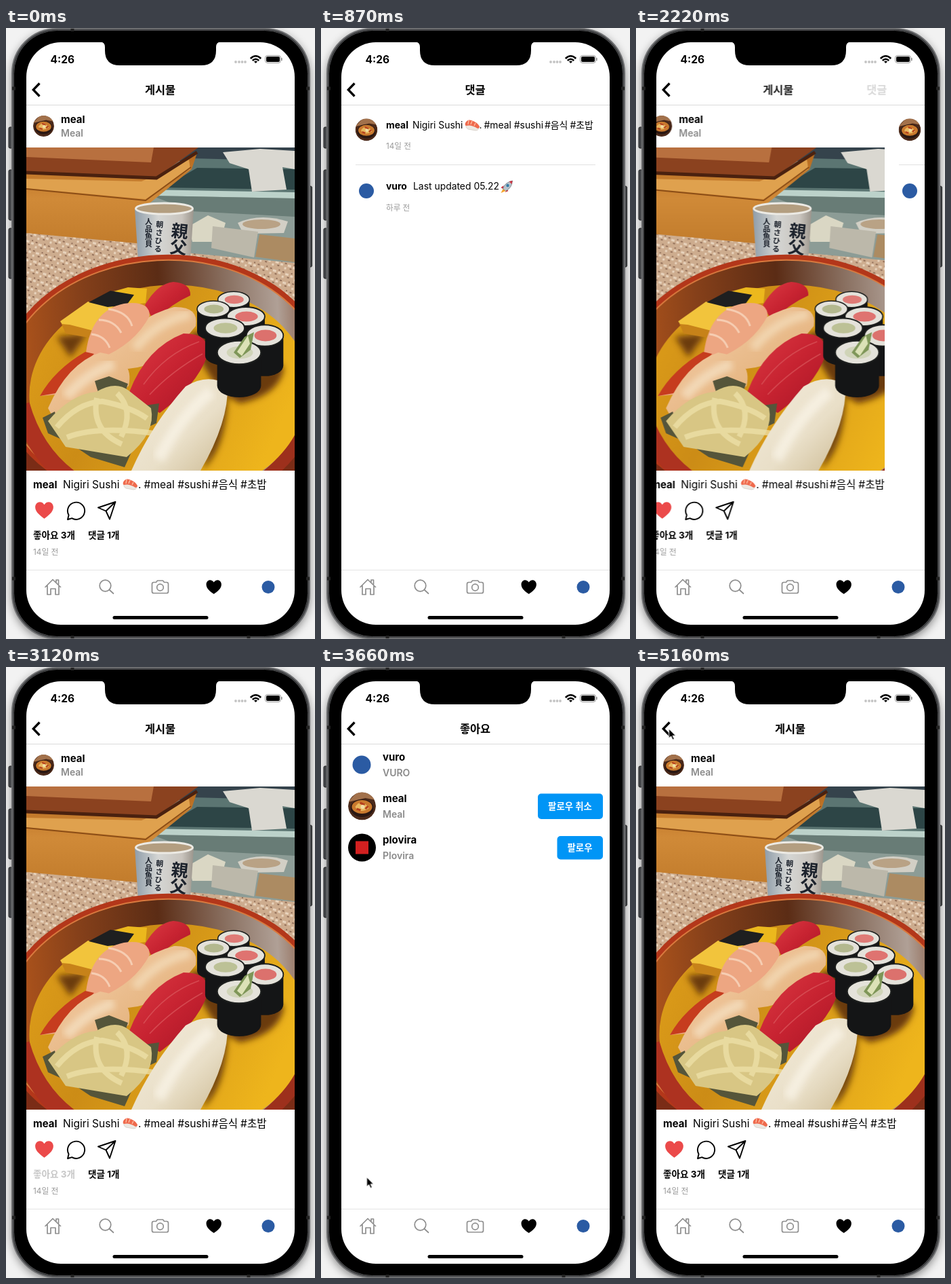
These frames come from a looping animation (456 by 900 pixels, 5.4 s). An HTML page:

```html
<!DOCTYPE html>
<html lang="ko">
<head>
<meta charset="utf-8">
<title>게시물</title>
<style>
  html, body { margin: 0; width: 100%; height: 100%; overflow: hidden; background: #eee; }
  svg { display: block; }
  #stage { width: 456px; height: 900px; }
  text { font: 15px Inter, "Noto Sans CJK KR", "Noto Sans CJK", sans-serif; white-space: pre; }
  .b { font-weight: 700; }
  .title { font-size: 16.4px; font-weight: 600; text-anchor: middle; }
  .sub { font-size: 14px; font-weight: 600; fill: #8a8a8a; }
  .date { font-size: 11.8px; fill: #999; }
  .count { font-size: 13.6px; font-weight: 700; }
  .caption text { font-size: 15.6px; }
  .small text { font-size: 13.9px; }
  .small .date { font-size: 11.6px; }
  .btn { font-size: 13.4px; font-weight: 700; fill: #fff; text-anchor: middle; }
  .ink text { font-weight: 700; font-size: 11px; }
  .ink .big { font-size: 25px; }

  .under, .comments, .likes { animation: under 5.4s cubic-bezier(.2, .7, .3, 1) infinite; --from: 396px; }
  .comments { animation-name: comments; }
  .likes { animation-name: likes; }
  .title { --gone: 0; --from: 150px; }
  @keyframes under {
    0%, 10.185%, 43.333%, 64.074%, 95.556%, 100% { transform: none; opacity: 1; }
    16.111%, 39.63%, 67.778%, 92.407% { transform: translateX(-119px); opacity: var(--gone, 1); }
  }
  @keyframes comments {
    0%, 10.185%, 43.333%, 100% { transform: translateX(var(--from)); opacity: var(--gone, 1); }
    16.111%, 39.63% { transform: none; opacity: 1; }
  }
  @keyframes likes {
    0%, 64.074%, 95.556%, 100% { transform: translateX(var(--from)); opacity: var(--gone, 1); }
    67.778%, 92.407% { transform: none; opacity: 1; }
  }

  .press-comments { animation: press-comments 5.4s step-end infinite; }
  .press-likes { animation: press-likes 5.4s step-end infinite; }
  .press-back { animation: press-back 5.4s step-end infinite; }
  @keyframes press-comments { 0%, 10.185% { opacity: 1; } 6.111% { opacity: .22; } }
  @keyframes press-likes { 0%, 64.444% { opacity: 1; } 57.778% { opacity: .22; } }
  @keyframes press-back { 0%, 40%, 92.778% { opacity: 1; } 36.111%, 88.333% { opacity: .33; } }

  .cursor { animation: move 5.4s infinite, appear 5.4s step-end infinite; }
  @keyframes appear { 0% { opacity: 0; } 65.556%, 100% { opacity: 1; } }
  @keyframes move {
    0%, 69.6% { transform: translate(67.5px, 751.5px); animation-timing-function: cubic-bezier(.4, .1, .6, .9); }
    74.444% { transform: translate(64px, 156px); animation-timing-function: cubic-bezier(.1, .6, .4, 1); }
    82.778%, 100% { transform: translate(48.5px, 91px); }
  }
</style>
</head>
<body>
<svg id="stage" viewBox="0 0 456 900">
  <defs>
    <filter id="shade" x="-10%" y="-10%" width="120%" height="120%"><feGaussianBlur stdDeviation="7"/></filter>
    <filter id="soft"><feGaussianBlur stdDeviation="5"/></filter>
    <linearGradient id="wood" x2="0" y2="1">
      <stop stop-color="#b5691f"/><stop offset=".5" stop-color="#d08a38"/><stop offset="1" stop-color="#c27c2c"/>
    </linearGradient>
    <linearGradient id="bowl">
      <stop stop-color="#b8591c"/><stop offset=".25" stop-color="#85401a"/><stop offset=".5" stop-color="#5b2c15"/>
      <stop offset=".72" stop-color="#8b7263"/><stop offset=".87" stop-color="#b0a096"/><stop offset="1" stop-color="#7d4a30"/>
    </linearGradient>
    <linearGradient id="floor" x2="1" y2=".4">
      <stop stop-color="#e0a01a"/><stop offset=".4" stop-color="#cc8c16"/><stop offset="1" stop-color="#eeb51c"/>
    </linearGradient>
    <linearGradient id="cup">
      <stop stop-color="#8f9da9"/><stop offset=".4" stop-color="#d5d6d4"/><stop offset=".8" stop-color="#c9c4bd"/><stop offset="1" stop-color="#9b958c"/>
    </linearGradient>
    <linearGradient id="tuna" x2="1" y2="1">
      <stop stop-color="#dc3a44"/><stop offset=".5" stop-color="#c72331"/><stop offset="1" stop-color="#a91526"/>
    </linearGradient>
    <linearGradient id="pale" x2="1" y2="1">
      <stop stop-color="#f4ecdc"/><stop offset=".6" stop-color="#e9dfc8"/><stop offset="1" stop-color="#cdbb94"/>
    </linearGradient>
    <linearGradient id="pink" x2="1" y2="1">
      <stop stop-color="#f2c9a2"/><stop offset="1" stop-color="#e2b078"/>
    </linearGradient>
    <pattern id="granite" width="19" height="13" patternUnits="userSpaceOnUse" patternTransform="rotate(17)">
      <rect width="19" height="13" fill="#cdac8e"/>
      <path d="M1 3h3M10 9h3M14 2h2" stroke="#93705a" stroke-width="2"/>
      <path d="M6 5h5M2 10h3M14 6h4" stroke="#ead6c0" stroke-width="3"/>
    </pattern>
    <clipPath id="content"><rect x="30" y="114" width="396" height="684"/></clipPath>
    <clipPath id="photo"><rect x="30" y="176" width="396" height="476"/></clipPath>
    <clipPath id="round"><circle r="20.5"/></clipPath>

    <g id="roll">
      <path d="M-30 0V42A30 15 0 0 0 30 42V0Z" fill="#141516"/>
      <ellipse rx="30" ry="15" fill="#e4e2da" stroke="#1d1f1e" stroke-width="2"/>
      <ellipse cx="1" rx="18" ry="8" fill="currentColor"/>
    </g>
    <g id="dish" clip-path="url(#round)">
      <circle r="20.5" fill="#4b2a1b"/>
      <path d="M-21-6L-7-21H12L21-9L5-12Z" fill="#a2714b"/>
      <ellipse cy="3" rx="17" ry="13" fill="#2a1712"/>
      <ellipse cy="1" rx="15" ry="10" fill="#c9792d"/>
      <path d="M-10 1Q-4-8 3-4T10 3Q2 9-7 6Z" fill="#e8b85f"/>
      <path d="M-3-5L4-2M-8 4L-2 6M5 4L9 0" stroke="#b63f1d" stroke-width="3"/>
      <circle cx="1" cy="1" r="3" fill="#f2dda5"/>
    </g>
    <g id="sushi">
      <path d="M2 9Q11 7 21 13Q21 18 16 18L5 16Q1 14 2 9Z" fill="#ece8e2" stroke="#cfc8bf" stroke-width=".7"/>
      <path d="M1 7Q4 1 10 3Q19 6 22 12Q22 15 19 15Q10 9 2 11Q0 10 1 7Z" fill="#ef6a4d"/>
      <path d="M6 3L5 9M11 4L9 9M16 7L14 11" stroke="#ffc2a6" stroke-width="1.3"/>
    </g>
    <g id="rocket">
      <path d="M5 8L1 11L4 13ZM10 14L7 18L12 16Z" fill="#c92c38"/>
      <path d="M4 13Q6 4 18 1Q17 12 8 16Z" fill="#b9c3cc" stroke="#68747d" stroke-width=".8"/>
      <path d="M13 2L18 1L17 6Z" fill="#ce3341"/>
      <circle cx="11" cy="8" r="2.2" fill="#347ca6"/>
      <path d="M4 13L1 19L8 16Z" fill="#f5a52d"/>
    </g>
    <path id="heart" d="M0 12C-5 8-13 3-13-4.500C-13-9-9.800-12-6.500-12C-3.500-12-1.300-10.500 0-8C1.300-10.500 3.500-12 6.500-12C9.800-12 13-9 13-4.500C13 3 5 8 0 12Z"/>
  </defs>

  <!-- Device -->
  <rect width="456" height="900" fill="#f2f2f2"/>
  <rect x="9" y="4" width="439" height="900" rx="68" opacity=".5" filter="url(#shade)"/>
  <g fill="#45474a" stroke="#242526">
    <rect x="4" y="146" width="8" height="31" rx="2"/>
    <rect x="4" y="209" width="8" height="74" rx="2"/>
    <rect x="4" y="295" width="8" height="74" rx="2"/>
    <rect x="445" y="233" width="6.500" height="119" rx="2"/>
  </g>
  <rect x="9" y="1" width="439" height="898" rx="66" fill="#3a3b3d" stroke="#6d6e70" stroke-width="2"/>
  <rect x="11.500" y="3.500" width="434" height="893" rx="64" fill="#000" stroke="#4d4e50"/>
  <path d="M9 89h5M443 89h5M9 811h5M443 811h5M98 1v4M358 895v4M98 895v4" stroke="#222" stroke-width="5"/>
  <rect x="30" y="21" width="396" height="858" rx="51" fill="#fff"/>
  <path d="M139 20Q146 21 146 28V33Q146 55 168 55H288Q310 55 310 33V28Q310 21 317 20Z"/>

  <!-- Status bar -->
  <text class="b" x="65.500" y="52" style="font-size:15.500px">4:26</text>
  <path d="M339 50h.01M344 50h.01M348.500 50h.01M353 50h.01" stroke="#c4c4c4" stroke-width="3.800" stroke-linecap="round"/>
  <g fill="none" stroke="#000" stroke-width="2.600">
    <path d="M360.800 45Q368.500 37.500 376.200 45M363.800 48Q368.500 43.500 373.200 48"/>
    <path d="M366 49.500Q368.500 47.500 371 49.500L368.500 52Z" fill="#000" stroke="none"/>
  </g>
  <rect x="382.500" y="40.500" width="23" height="11" rx="3.500" fill="none" stroke="#999"/>
  <rect x="384" y="42" width="20" height="8" rx="2"/>
  <path d="M407 44V48" stroke="#999" stroke-width="1.500"/>

  <!-- Header -->
  <text class="title under" x="227.500" y="96.500">게시물</text>
  <text class="title comments" x="227.500" y="96.500">댓글</text>
  <text class="title likes" x="227.500" y="96.500">좋아요</text>
  <path class="press-back" d="M49.500 81.500L40.300 91L49.500 100.500" fill="none" stroke="#000" stroke-width="3.300"/>
  <path d="M30 113.500H426" stroke="#dadada"/>

  <g clip-path="url(#content)">
    <g class="under">
      <use href="#dish" transform="translate(55.500 144.500) scale(.756)"/>
      <text class="b" x="81" y="140">meal</text>
      <text class="sub" x="81" y="159.500">Meal</text>

      <g clip-path="url(#photo)">
        <rect x="30" y="176" width="396" height="476" fill="#7a2c16"/>

        <!-- Glass case -->
        <path d="M200 176H426V350H200Z" fill="#8c9c96"/>
        <path d="M262 176H426V196H240Z" fill="#35434c"/>
        <path d="M275 192L426 196V246L206 242Z" fill="#5b7572"/>
        <path d="M282 206L426 208V238L232 235Z" fill="#2d4546"/>
        <path d="M206 238L426 242V251L215 247Z" fill="#bcd2ca"/>
        <path d="M215 247L426 251V278L275 270Z" fill="#687c76"/>
        <path d="M320 183L375 178L426 181V208L408 205L414 238L363 241L358 208L330 199Z" fill="#dad8d1"/>
        <path d="M270 292L298 276L324 287L316 315H275Z" fill="#dad7c4"/>
        <path d="M342 287Q375 272 416 285L410 302L350 303Z" fill="#d2cfc5"/>
        <ellipse cx="377" cy="289" rx="28" ry="7" fill="#b9a285"/>
        <path d="M305 292L372 300L366 338L303 324Z" fill="#bcb8aa"/>
        <path d="M374 304L426 310V345L368 337Z" fill="#ac8b62"/>

        <!-- Counter and wooden box -->
        <path d="M30 300L200 316L275 332L426 346V430L30 460Z" fill="url(#granite)"/>
        <path d="M30 206L222 218L282 184L274 208L207 262L203 318L30 302Z" fill="url(#wood)"/>
        <path d="M30 222L200 226L270 194L272 208L206 252L30 236Z" fill="#dfa14e"/>
        <path d="M30 237L206 254L273 205" fill="none" stroke="#8b4d16" stroke-width="2"/>
        <path d="M30 176H284L222 220L30 211Z" fill="#8b421f"/>
        <path d="M30 176H218L214 198L30 190Z" fill="#b8703f"/>
        <path d="M30 213L222 221L282 183" fill="none" stroke="#4a210f" stroke-width="5"/>

        <!-- Cup -->
        <path d="M190 266Q233 248 277 266L272 342H195Z" fill="url(#cup)"/>
        <ellipse cx="233.500" cy="266" rx="42" ry="8" fill="#b39e80" stroke="#eceae4" stroke-width="3"/>
        <g class="ink" fill="#1c222c">
          <text class="big" transform="translate(243 307) rotate(6)">親</text>
          <text class="big" transform="translate(241 331) rotate(6)">父</text>
          <text transform="translate(221 293) rotate(4)">朝<tspan x="0" dy="12">さ</tspan><tspan x="0" dy="12">ひ</tspan><tspan x="0" dy="12">る</tspan></text>
          <text x="205" y="289">人<tspan x="205" dy="11">品</tspan><tspan x="205" dy="11">魚</tspan><tspan x="205" dy="11">貝</tspan></text>
        </g>

        <!-- Bowl -->
        <g transform="rotate(-3 232 512)">
          <ellipse cx="232" cy="518" rx="243" ry="184" fill="#b3371a"/>
          <ellipse cx="232" cy="519" rx="235" ry="177" fill="url(#bowl)" stroke="#d97a3f" stroke-width="2"/>
          <ellipse cx="240" cy="537" rx="207" ry="158" fill="url(#floor)"/>
        </g>
        <path d="M22 555Q46 640 120 680" fill="none" stroke="#ad3220" stroke-width="26"/>
        <path d="M436 600Q420 632 380 664" fill="none" stroke="#9d301c" stroke-width="18"/>
        <g filter="url(#soft)">
          <path d="M75 455L120 450L95 485ZM290 495L270 450L330 440L410 500Q405 540 345 553L315 535Z" fill="#6b3a0d"/>
          <path d="M315 555L327 540Q325 620 290 650Z" fill="#6f420c"/>
        </g>

        <!-- Egg, tuna, squid and shrimp -->
        <path d="M148 391L180 382L208 384L206 405L170 410Z" fill="#ecb81d"/>
        <path d="M80 432L121 403L158 410L132 452L90 448Z" fill="#f2c43c"/>
        <path d="M82 436L94 437L129 446L122 456L88 450Z" fill="#c78219"/>
        <path d="M122 404L154 387L189 393L178 408L150 411Z" fill="#1e1f20"/>
        <path d="M205 408Q224 376 247 374Q273 376 272 394Q245 406 218 431Z" fill="url(#tuna)"/>
        <path d="M145 483Q190 426 248 411Q285 410 280 439Q235 498 180 502Z" fill="url(#pink)"/>
        <path d="M190 472Q225 430 272 422" fill="none" stroke="#f4dfbd" stroke-width="14" opacity=".7" filter="url(#soft)"/>
        <path d="M50 542Q75 503 118 478Q126 416 174 406Q212 401 212 424Q190 466 138 487Q98 515 74 540Z" fill="#eda682"/>
        <path d="M50 542Q72 503 117 477L130 480Q95 515 73 538Z" fill="#c63c1e"/>
        <path d="M137 430Q160 430 170 449M151 414Q180 418 186 439M126 451Q146 453 153 471" fill="none" stroke="#f6cdb2" stroke-width="3"/>
        <path d="M62 560Q91 494 139 478Q190 486 181 527Q140 570 67 569Z" fill="url(#pink)"/>
        <path d="M89 543Q120 508 159 495" fill="none" stroke="#f6e4c8" stroke-width="16" opacity=".7" filter="url(#soft)"/>
        <path d="M182 536Q207 471 262 450Q303 450 297 483Q281 527 227 567Q198 554 182 536Z" fill="url(#tuna)"/>
        <path d="M203 525Q235 480 285 462M212 540Q245 505 290 480" fill="none" stroke="#dc5a5e" stroke-width="1.500" opacity=".7"/>

        <!-- Pale pieces in front -->
        <path d="M131 520L152 513L180 524L172 548L140 550ZM205 556L226 553L222 582L205 590ZM54 574L72 565L82 606L62 597ZM95 612L185 625L175 647L125 632Z" fill="#55553a"/>
        <path d="M62 579Q96 539 133 536Q162 519 181 534L214 560Q222 597 178 632L88 617Z" fill="#d8c684"/>
        <g fill="none" stroke="#eee0a8" stroke-width="8" opacity=".75">
          <path d="M75 588Q105 552 142 550Q184 558 208 575M90 603Q135 585 225 598M134 545Q125 593 171 613M164 538Q190 563 170 602"/>
        </g>
        <path d="M185 652Q215 584 265 528Q297 508 327 525Q329 580 287 652Z" fill="url(#pale)"/>
        <path d="M225 635Q255 575 303 535" fill="none" stroke="#faf5e9" stroke-width="18" opacity=".7" filter="url(#soft)"/>

        <!-- Rolls -->
        <use href="#roll" transform="translate(336 400) scale(.78)" color="#df7b76"/>
        <use href="#roll" transform="translate(306 414) scale(.8)" color="#b3b88e"/>
        <use href="#roll" transform="translate(354 425) scale(.93)" color="#df7370"/>
        <use href="#roll" transform="translate(323 442) scale(.97)" color="#bcc196"/>
        <use href="#roll" transform="translate(382 453) scale(.91 1.050)" color="#dc716d"/>
        <use href="#roll" transform="translate(344 478) scale(1.080 1.160)" color="#d0d4b8"/>
        <path d="M336 478L352 455L366 448L361 474L345 486Z" fill="#7e9658"/>
        <path d="M341 477L357 453L360 465L348 483Z" fill="#dce2b7"/>
      </g>

      <text class="b" x="40" y="677.500">meal</text>
      <g class="caption">
        <text x="84" y="678">Nigiri Sushi</text>
        <use href="#sushi" x="172" y="662"/>
        <text x="195" y="678">.</text>
        <text x="203.500" y="678">#meal #sushi</text>
        <text x="303.500" y="678">#음식</text>
        <text x="346" y="678">#초밥</text>
      </g>
      <use href="#heart" transform="translate(56.500 710.500) scale(1.030)" fill="#eb4a4a"/>
      <g fill="none" stroke="#000" stroke-width="1.900" stroke-linejoin="round">
        <path d="M91 724L92.600 717.500A12.600 12.600 0 1 1 97.300 722.200Z"/>
        <path d="M161.500 698L153 723.500L147.500 711.500L136 706.500ZM147.500 711.500L161.500 698"/>
      </g>
      <text class="count press-likes" x="40" y="752">좋아요 3개</text>
      <text class="count press-comments" x="121" y="752">댓글 1개</text>
      <text class="date" x="40" y="776">14일 전</text>
    </g>

    <g class="comments small">
      <rect x="30" y="114" width="396" height="684" fill="#fff"/>
      <use href="#dish" transform="translate(67 150) scale(.8)"/>
      <text class="b" x="96" y="147.500">meal</text>
      <text x="135" y="147.500">Nigiri Sushi</text>
      <use href="#sushi" x="212" y="133"/>
      <text x="233.500" y="147.500">.</text>
      <text x="240.500" y="147.500">#meal #sushi</text>
      <text x="330" y="147.500">#음식</text>
      <text x="367.500" y="147.500">#초밥</text>
      <text class="date" x="96" y="178">14일 전</text>
      <path d="M51 201.500H405" stroke="#e2e2e2"/>
      <circle cx="67" cy="240" r="11" fill="#2b5ba3"/>
      <text class="b" x="96" y="238">vuro</text>
      <text x="136" y="238">Last updated 05.22</text>
      <use href="#rocket" x="264.500" y="224"/>
      <text class="date" x="96" y="268.500">하루 전</text>
    </g>

    <g class="likes">
      <rect x="30" y="114" width="396" height="684" fill="#fff"/>
      <circle cx="60" cy="144" r="13.500" fill="#2b5ba3"/>
      <text class="b" x="91" y="138">vuro</text>
      <text class="sub" x="91" y="160.500">VURO</text>
      <use href="#dish" x="60.500" y="205"/>
      <text class="b" x="91" y="199">meal</text>
      <text class="sub" x="91" y="221.500">Meal</text>
      <circle cx="60.500" cy="266" r="20.500"/>
      <rect x="51" y="256.500" width="19" height="19" fill="#d32020"/>
      <text class="b" x="91" y="260">plovira</text>
      <text class="sub" x="91" y="282.500">Plovira</text>
      <rect x="320" y="186.500" width="96" height="37.500" rx="5" fill="#0095f6"/>
      <text class="btn" x="367.500" y="210">팔로우 취소</text>
      <rect x="348.500" y="249" width="67.500" height="34.500" rx="5" fill="#0095f6"/>
      <text class="btn" x="382" y="271">팔로우</text>
    </g>
  </g>

  <!-- Tab bar -->
  <path d="M30 798.500H426" stroke="#e4e4e4"/>
  <g fill="none" stroke="#8e8e8e" stroke-width="1.700" stroke-linejoin="round" stroke-linecap="round">
    <path d="M58 823.500L69 812.500L80.500 823.500M61 821.500V834.500H66V826H73V834.500H78V821.500M74 816.500V813H77.500V820"/>
    <circle cx="146.500" cy="821.500" r="8.300"/><path d="M152.500 827.500L158.500 833"/>
    <path d="M218 816.500H221.500L223.500 814H231.500L233.500 816.500H237Q239.500 816.500 239.500 819V830Q239.500 832.500 237 832.500H218Q215.500 832.500 215.500 830V819Q215.500 816.500 218 816.500Z"/>
    <circle cx="227.500" cy="824" r="4.800"/>
  </g>
  <use href="#heart" transform="translate(306.700 823.500) scale(.86)"/>
  <circle cx="387" cy="823.500" r="9.500" fill="#2b5ba3"/>
  <rect x="157.500" y="866" width="141" height="5" rx="2.500"/>

  <path class="cursor" d="M0 0V14L3.200 11L5.700 16.300L8 15.200L5.700 10.200H10Z" stroke="#fff"/>
</svg>
</body>
</html>
```
